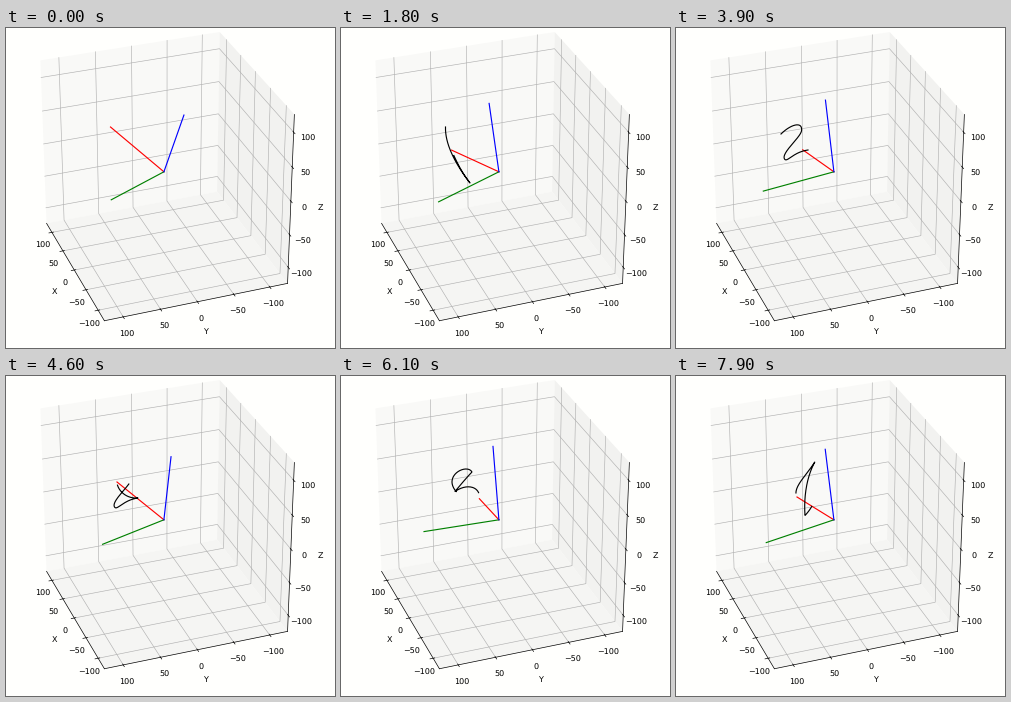
These frames come from a looping animation (329x320 px, 8000 ms). A matplotlib script:

```python
import numpy as np
import matplotlib.pyplot as plt
from matplotlib.animation import FuncAnimation

plt.rcParams.update({"font.family": "DejaVu Sans", "text.hinting": "none",
                     "text.hinting_factor": 1})

W, H, DPI = 329, 320, 100
PT = 0.55                      # scale of default point sizes
CX, CY, SX, SY = 157.9, 143.8, 96.4, 95.7
PERSP = 0.0521
LIMIT = 125
ARM = 100 / LIMIT
TRAIL = 17

az, el = np.radians(160), np.radians(30)
CAM = np.array([
    [-np.sin(az), np.cos(az), 0],
    [-np.sin(el) * np.cos(az), -np.sin(el) * np.sin(az), np.cos(el)],
    [np.cos(el) * np.cos(az), np.cos(el) * np.sin(az), np.sin(el)],
])
UP = CAM[:, 2]

# Pen strokes as chained Bezier curves: end time, two handles, end point
START = (104.5, 99)
STROKES = [
    (4, (104, 114), (112, 133), (129, 155)),     # reach down
    (14, (116, 139), (107, 114), (105, 106)),    # and back
    (19, (115, 96), (127, 93), (125.5, 103)),    # two
    (24, (124, 110), (105, 125), (108.5, 131)),
    (30, (111, 135), (117, 124), (132, 122)),
    (37, (119, 123), (111, 113), (111, 106)),    # upward hook
    (42, (111, 95), (127, 89), (131, 96)),
    (46, (126, 101), (116, 113), (114, 115.5)),  # three
    (53, (132, 103), (150, 117), (129, 139.5)),
    (62, (128, 126), (129, 104), (138.8, 86)),   # up and down
    (69, (130, 100), (116, 112), (121, 121)),
]
TIMES = np.array([0] + [s[0] for s in STROKES])
ENDS = [START] + [s[3] for s in STROKES]
CURVES = np.array([(p, *s[1:]) for p, s in zip(ENDS, STROKES)])


def tip(t):
    """Red tip on screen at time t."""
    t = np.asarray(t, float)
    i = np.clip(np.searchsorted(TIMES, t, side="right") - 1, 0, len(STROKES) - 1)
    u = (t - TIMES[i]) / (TIMES[i + 1] - TIMES[i])
    v = 1 - u
    weights = np.stack([v ** 3, 3 * v * v * u, 3 * v * u * u, u ** 3], -1)
    return np.einsum("...k,...kc->c...", weights, CURVES[i])


def screen(c):
    """Camera coordinates to pixels."""
    c = np.asarray(c, float)
    depth = 1 - PERSP * c[..., 2]
    return CX + SX * c[..., 0] / depth, CY - SY * c[..., 1] / depth


def project(points):
    return screen(np.asarray(points, float) @ CAM.T)


def lift(x, y):
    """Pixel to the far side of the sphere swept by the arm."""
    dx, dy, z = (x - CX) / SX, (CY - y) / SY, 0.0
    for _ in range(8):
        k = 1 - PERSP * z
        z = -np.sqrt(max(0.0, ARM ** 2 - (dx * dx + dy * dy) * k * k))
    return np.array([dx * k, dy * k, z])


def unit(v):
    return v / np.linalg.norm(v)


def arms(t):
    x, y = tip(t)
    red = unit(lift(x, y))
    side = unit(np.cross(UP, red))
    top = np.cross(red, side)
    # the wrist rolls as the pen rises and moves right
    roll = np.radians(1.5 + 0.12 * (x - 120) - 0.27 * (y - 105))
    green = np.cos(roll) * side + np.sin(roll) * top
    return red * ARM, green * ARM, np.cross(red, green) * ARM


fig = plt.figure(figsize=(W / DPI, H / DPI), dpi=DPI, facecolor="#fffffd")
ax = fig.add_axes([0, 0, 1, 1])
ax.set_xlim(0, W)
ax.set_ylim(H, 0)
ax.axis("off")


def line(points, color, width, z):
    ax.plot(*project(points), color=color, lw=width * PT, zorder=z)


def label(point, text, va):
    x, y = project(point)
    ax.text(x, y, text, size=10 * PT, ha="center", va=va, zorder=4)


def draw_box():
    panes = [
        ([(1, 1, -1), (1, -1, -1), (1, -1, 1), (1, 1, 1)], "#f9f9f7"),
        ([(1, -1, -1), (-1, -1, -1), (-1, -1, 1), (1, -1, 1)], "#f2f2f0"),
        ([(1, 1, -1), (1, -1, -1), (-1, -1, -1), (-1, 1, -1)], "#f5f5f3"),
    ]
    for corners, shade in panes:
        ax.fill(*project(corners), color=shade, lw=0, zorder=0)

    pad, far, out, inn = 1.1034, 1.2247, 1 + 1 / 30, 1 - 1 / 60
    for value in range(-100, 101, 50):
        v = value / LIMIT
        text = str(value).replace("-", "\u2212")
        for grid in ([(v, 1, -1), (v, -1, -1), (v, -1, 1)],
                     [(-1, v, -1), (1, v, -1), (1, v, 1)],
                     [(1, 1, v), (1, -1, v), (-1, -1, v)]):
            line(grid, "#b0b0b0", 0.8, 1)
        for tick in ([(v, inn, -1), (v, out, -1)],
                     [(-inn, v, -1), (-out, v, -1)],
                     [(-inn, -1, v), (-out, -1, v)]):
            line(tick, "black", 0.9, 2)
        for spot in ((v, pad, -pad), (-pad, v, -pad), (-pad, -pad, v)):
            label(spot, text, "top")

    for edge in ([(-1, 1, -1), (1, 1, -1)],
                 [(-1, 1, -1), (-1, -1, -1)],
                 [(-1, -1, -1), (-1, -1, 1)]):
        line(edge, "black", 0.9, 2)
    label((0, far, -far), "X", "center")
    label((-far, 0, -far), "Y", "center")
    label((-far, -far, 0), "Z", "center")


draw_box()
rods = [ax.plot([], [], color=c, lw=1.5 * PT, zorder=5)[0]
        for c in ("red", "green", "blue")]
trail, = ax.plot([], [], color="black", lw=1.5 * PT, zorder=6)


def update(n):
    # still at the start, then two short stalls
    t = max(0, n - 8 - (n >= 40) - (n >= 58))
    for rod, end in zip(rods, arms(t)):
        rod.set_data(*screen([np.zeros(3), end]))
    if t > 1:
        trail.set_data(*tip(np.linspace(max(0, t - TRAIL), t - 1, 140)))
    else:
        trail.set_data([], [])
    return rods + [trail]


anim = FuncAnimation(fig, update, frames=80, interval=100, repeat=True,
                     repeat_delay=0, blit=False)
plt.show()
```
